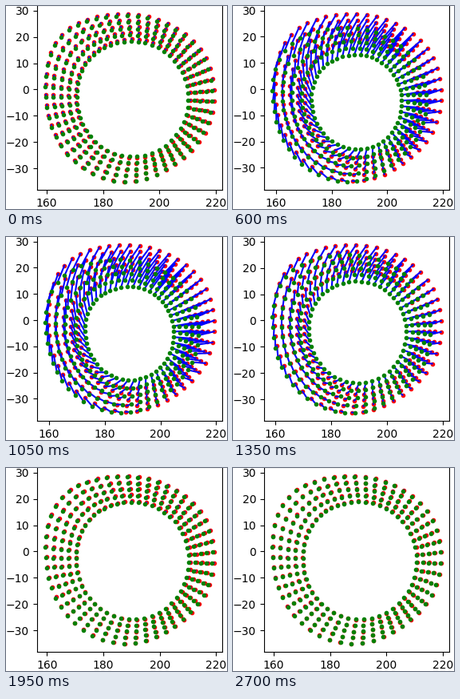
A matplotlib script for the animation above (2850 ms loop, 277x254 px).

```python
import numpy as np
import matplotlib.pyplot as plt
from matplotlib.animation import FuncAnimation

W, H, DPI = 277, 254, 100
FRAMES, INTERVAL = 19, 150
SPOKES, RINGS = 50, 5


def angle_bump(theta, center, width):
    """Gaussian bump on the circle, all angles in degrees."""
    offset = (theta - center + 180) % 360 - 180
    return np.exp(-0.5 * (offset / width) ** 2)


def wave(theta, phase):
    return np.cos(np.radians(theta - phase))


def to_data(px, py):
    """Stage pixels to axis units."""
    return 160 + (px - 51) / 3.55, (103.8 - py) / 3.28


# Spokes counted from the bottom, slightly denser in the upper left
even = np.arange(SPOKES) * 360 / SPOKES
deg = -92 + even + 4.7 * wave(even, 120) + 2 * angle_bump(even, 198, 18)
cos, sin = wave(deg, 0), wave(deg, 90)

# Both walls are circles with soft bulges
bulge = angle_bump(deg, 138, 20)
outer_r = (104.7 + 12.5 * bulge - 5.5 * angle_bump(deg, 305, 20)
           + 3 * angle_bump(deg, 30, 15))
inner_r = 73 - wave(2 * deg, 0) + 3 * bulge

depth = np.linspace(0, 1, RINGS)[:, None]      # 0 inner wall, 1 outer wall


def blend(inner, outer):
    return inner + (outer - inner) * depth


rest_x = blend(160 + inner_r * cos, 156.5 + outer_r * cos)
rest_y = 115 - blend(inner_r, outer_r) * sin

# Displacement at full contraction: inward squeeze and counter-clockwise twist
squeeze = blend(16.5, 10) + blend(8, 14) * wave(deg, 40)
twist = blend(6, 9) + blend(8, 15) * wave(deg, 165)
move_x = -squeeze * cos - twist * sin
move_y = squeeze * sin - twist * cos


def contraction(i):
    return 0.05 + 0.95 * np.exp(-(abs(i - 5.8) / 4.2) ** 2.8)


def left_drift(i):
    return -0.9 * np.exp(-0.5 * ((i - 13) / 2) ** 2)


fig = plt.figure(figsize=(W / DPI, H / DPI), dpi=DPI)
ax = fig.add_axes([38.8 / W, 23.7 / H, 232.5 / W, 231 / H])
ax.set_xticks(range(160, 221, 20))
ax.set_yticks(range(-30, 31, 10))

rest = to_data(rest_x.ravel(), rest_y.ravel())
ax.plot(*rest, "r.")
links, = ax.plot([], [], "b-", lw=1.5)
moved, = ax.plot([], [], "g.")


def joined(a, b):
    """Separate segments a-b as one broken line."""
    return np.column_stack([a, b, np.full_like(a, np.nan)]).ravel()


def update(i):
    amount = contraction(i)
    now = to_data((rest_x + amount * move_x + left_drift(i)).ravel(),
                  (rest_y + amount * move_y).ravel())
    moved.set_data(*now)
    links.set_data(joined(rest[0], now[0]), joined(rest[1], now[1]))
    ax.relim()
    ax.autoscale(True)
    ax.autoscale_view()
    return links, moved


anim = FuncAnimation(fig, update, frames=FRAMES, init_func=lambda: update(0),
                     interval=INTERVAL, repeat=True, repeat_delay=0)
plt.show()
```
